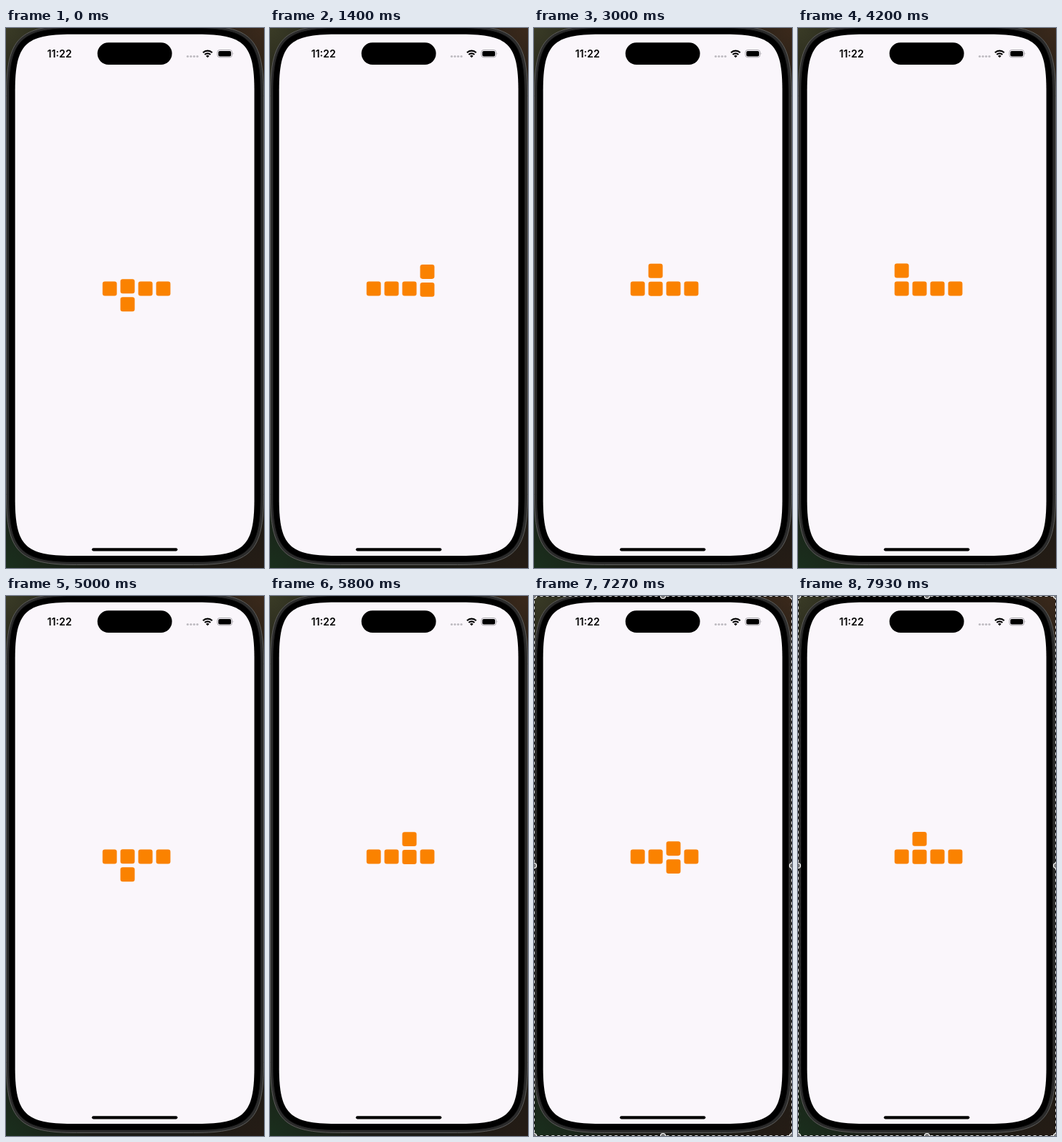
Recreate the animation shown at these times as an HTML page. Size 360 px wide and 751 px high, loop 8 s.

```html
<!DOCTYPE html>
<html lang="en">
<head>
<meta charset="utf-8">
<title>Weaving squares loader</title>
<style>
  html, body { margin: 0; width: 100%; height: 100%; overflow: hidden; background: #1a1a15; }
  svg { display: block; width: 100vw; height: 100vh; }
  text { font: 600 14.2px Inter, "Liberation Sans", sans-serif; }
</style>
</head>
<body>
<svg viewBox="0 0 360 751" preserveAspectRatio="none">
  <defs id="glows"></defs>
  <rect width="360" height="751" fill="#1a1a15"/>
  <g id="backdrop"></g>
  <g id="phone"></g>

  <text x="57.6" y="40.8">11:22</text>
  <rect x="127.600" y="20.200" width="104" height="30.700" rx="15.350"/>
  <g id="signal" fill="#bdbac0"></g>
  <g fill="none" stroke="#000" stroke-width="2.1">
    <path d="M274.9 34.3a9 9 0 0 1 12.8 0"/>
    <path d="M277.3 37.1a5.6 5.6 0 0 1 8 0"/>
  </g>
  <path d="M279 38.9a3.3 3.3 0 0 1 4.6 0L281.3 41.3z"/>
  <rect x="294.900" y="30.500" width="20.600" height="10.300" rx="3.300" fill="none" stroke="#a3a1a6" stroke-width=".9"/>
  <rect x="296.300" y="31.900" width="17.800" height="7.500" rx="2"/>
  <path d="M316.7 34.1q1.500 1.500 0 3.200z" fill="#a3a1a6"/>
  <rect x="119.800" y="723.200" width="119.600" height="4.200" rx="2.100"/>

  <g id="squares" fill="#fa8200"></g>

  <g id="selection" visibility="hidden">
    <rect x=".5" y=".5" width="359" height="750" fill="none" stroke="#111"/>
    <rect x=".5" y=".5" width="359" height="750" fill="none" stroke="#ddd" stroke-dasharray="4 4"/>
  </g>
</svg>
<script>
const LOOP = 8000;
const STEP = 410.3;            // one slide or push
const ANCHOR = 1333;           // a push down in the last column starts here
const HOLD = [130, 530];       // the picture stands still
const SELECT_AT = 7000;
const SIZE = 19.95, PITCH = 24.93, LEFT = 134.7, MIDDLE = 352.5;

// Stops of the spare square: [column, side], side -1 above and 1 below the row.
const STOPS = [
  [3, -1], [3, 1], [2, 1], [2, -1], [1, -1], [1, 1],
  [0, 1], [0, -1], [1, -1], [1, 1], [2, 1], [2, -1]
];

const $ = id => document.getElementById(id);

function add(parent, tag, attrs) {
  const node = document.createElementNS("http://www.w3.org/2000/svg", tag);
  for (const name in attrs) node.setAttribute(name, attrs[name]);
  return parent.appendChild(node);
}

function glow(id, color, cx, cy) {
  const gradient = add($("glows"), "radialGradient", { id });
  add(gradient, "stop", { "stop-color": color });
  add(gradient, "stop", { offset: 1, "stop-color": color, "stop-opacity": 0 });
  add($("backdrop"), "circle", { cx, cy, r: 120, fill: `url(#${id})` });
}

// Rectangle with smooth, continuous corners.
function softRect(x, y, right, bottom, radius) {
  const reach = radius * 1.528, h = reach * 0.178;
  return `M${x} ${y + reach}C${x} ${y + h} ${x + h} ${y} ${x + reach} ${y}
    H${right - reach}C${right - h} ${y} ${right} ${y + h} ${right} ${y + reach}
    V${bottom - reach}C${right} ${bottom - h} ${right - h} ${bottom} ${right - reach} ${bottom}
    H${x + reach}C${x + h} ${bottom} ${x} ${bottom - h} ${x} ${bottom - reach}Z`;
}

glow("olive", "#3a3b26", 0, 0);
glow("brown", "#3b291b", 360, 0);
glow("green", "#1a2f1d", 0, 751);
glow("umber", "#251c15", 360, 751);

[
  [0.5, -3.5, 359.5, 746.5, 64, "#2b2b2b", "#5c5c5a"],
  [4.5, 0.5, 355, 742.5, 60, "#000", "#0c0c0c"],
  [12.7, 8.7, 346.5, 734, 51.5, "#faf6fb", "none"]
].forEach(([x, y, right, bottom, radius, fill, stroke]) =>
  add($("phone"), "path", { d: softRect(x, y, right, bottom, radius), fill, stroke }));

for (let i = 0; i < 4; i++) add($("signal"), "circle", { cx: 253.5 + 4.5 * i, cy: 39.5, r: 1.6 });

for (const x of [0, 180, 360])
  for (const y of [0, 375, 751])
    if (x !== 180 || y !== 375)
      add($("selection"), "circle", { cx: x, cy: y, r: 3.5, fill: "#777", stroke: "#fff", "stroke-width": 1.2 });

const squares = Array.from({ length: 5 }, () =>
  add($("squares"), "rect", { width: SIZE, height: SIZE, rx: 3.3 }));

// cubic-bezier(.42, 0, .58, 1), solved by bisection
function easeInOut(x) {
  let low = 0, high = 1, u = 0.5;
  for (let i = 0; i < 20; i++) {
    u = (low + high) / 2;
    const v = 1 - u;
    if (3 * v * v * u * 0.42 + 3 * v * u * u * 0.58 + u ** 3 < x) low = u; else high = u;
  }
  return u * u * (3 - 2 * u);
}

function place(square, column, row) {
  square.setAttribute("x", LEFT + column * PITCH);
  square.setAttribute("y", MIDDLE + row * PITCH);
}

function draw(time) {
  const held = time >= HOLD[0] && time < HOLD[1];
  const steps = held
    ? Math.floor((HOLD[0] - ANCHOR) / STEP)
    : (time - ANCHOR) / STEP;
  const phase = steps + STOPS.length;
  const index = Math.floor(phase);
  const p = easeInOut(phase - index);
  const [column, side] = STOPS[index % STOPS.length];
  const [nextColumn, nextSide] = STOPS[(index + 1) % STOPS.length];
  const shift = (nextSide - side) / 2 * p;

  for (let i = 0; i < 4; i++) place(squares[i], i, i === column ? shift : 0);
  place(squares[4], column + (nextColumn - column) * p, side + shift);
  $("selection").setAttribute("visibility", time >= SELECT_AT ? "visible" : "hidden");
}

const start = performance.now();
function tick() {
  draw((performance.now() - start) % LOOP);
  requestAnimationFrame(tick);
}
tick();
</script>
</body>
</html>
```
